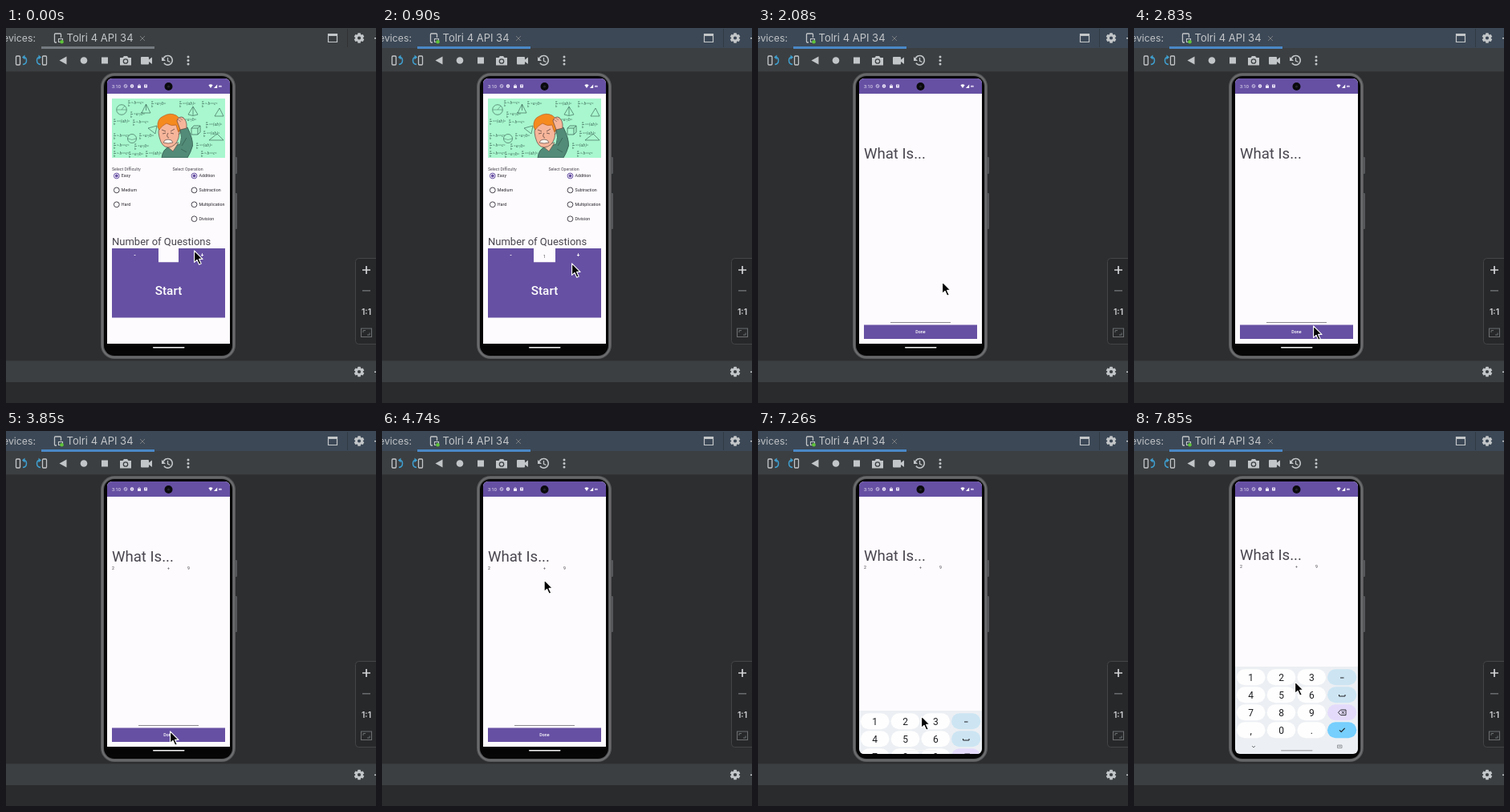
Write an HTML page with a canvas that moves like this. It is 461 px wide and 468 px high and loops after 8 s.

```html
<!DOCTYPE html>
<html lang="en">
<head>
<meta charset="utf-8">
<title>Quiz app in emulator</title>
<style>
html, body { margin: 0; width: 100%; height: 100%; overflow: hidden; background: #2d2e30; }
canvas { display: block; width: 461px; height: 468px; }
</style>
</head>
<body>
<canvas id="stage" width="461" height="468"></canvas>
<script>
const ctx = document.getElementById('stage').getContext('2d');
const LOOP = 8000, TICK = 148.2;
const PURPLE = '#6650a3', PAPER = '#fefbfe', INK = '#48454e', ICON = '#c3c6c8';
const UI = 'Inter, sans-serif', APP = 'Roboto, sans-serif';

// pointer stops: tick, x, y
const PATH = [
  [0, 234, 277], [3, 234, 277], [4, 235, 284], [6, 236, 293], [8, 237, 287],
  [9, 237, 287], [11, 235, 299], [12, 229, 316], [16, 229, 316], [19, 223, 371],
  [20, 214, 374], [22, 171, 217], [24, 205, 374], [26, 204, 374], [28, 207, 290],
  [32, 201.5, 185], [34, 197.5, 178.5], [35, 197.5, 178.5], [38, 188.5, 216],
  [41, 213, 160], [42, 218.5, 165], [44, 218.5, 165], [48, 203, 355],
  [50, 203, 355], [52, 202, 335], [53, 200, 312]
];

function box(x, y, w, h, fill, r = 0) {
  ctx.fillStyle = fill;
  ctx.beginPath();
  ctx.roundRect(x, y, w, h, r);
  ctx.fill();
}
function frame(x, y, w, h, color, lw = 1, r = 0) {
  ctx.strokeStyle = color;
  ctx.lineWidth = lw;
  ctx.beginPath();
  ctx.roundRect(x, y, w, h, r);
  ctx.stroke();
}
function disc(x, y, r, fill) {
  ctx.fillStyle = fill;
  ctx.beginPath();
  ctx.arc(x, y, r, 0, 7);
  ctx.fill();
}
function ring(x, y, r, color, lw = 1, a = 0, b = Math.PI * 2) {
  ctx.strokeStyle = color;
  ctx.lineWidth = lw;
  ctx.beginPath();
  ctx.arc(x, y, r, a, b);
  ctx.stroke();
}
function shape(d, fill, stroke, lw = 1) {
  const p = new Path2D(d);
  if (fill) { ctx.fillStyle = fill; ctx.fill(p); }
  if (stroke) { ctx.strokeStyle = stroke; ctx.lineWidth = lw; ctx.stroke(p); }
}
function text(s, x, y, size, color, align = 'left', weight = 400, family = APP) {
  ctx.font = `${weight} ${size}px ${family}`;
  ctx.textAlign = align;
  ctx.fillStyle = color;
  ctx.fillText(s, x, y);
}

function gear(x, y) {
  for (let i = 0; i < 6; i++) {
    ctx.save();
    ctx.translate(x, y);
    ctx.rotate(i * Math.PI / 3);
    box(-1.8, -6.3, 3.6, 3, ICON, .5);
    ctx.restore();
  }
  ring(x, y, 3.5, ICON, 2.8);
}

function header(focused) {
  box(0, 0, 461, 25, focused ? '#3c4856' : '#3c3f41');
  text('evices:', 37, 17, 12.3, '#bfc2c5', 'right', 400, UI);
  shape('M63 18H61.5Q60.5 18 60.5 17V8Q60.5 7 61.5 7H67.5Q68.5 7 68.5 8V12', null, ICON, 1.3);
  frame(65.5, 13.5, 5, 4, ICON, 1.1);
  disc(69.5, 17.3, 2.3, '#5fc33b');
  text('Tolri 4 API 34', 75.5, 17, 13, '#c3c6c9', 'left', 400, UI);
  shape('M167 10L173 16M173 10L167 16', null, '#777b7f');
  frame(401.5, 7.5, 11, 10, ICON, 1.2);
  box(401, 7, 12, 3, ICON);
  box(425, 1, 1, 23, focused ? '#2f3a45' : '#2f3133');
  gear(440, 12.5);
  box(459, 12, 2, 1.5, ICON);
}

function toolbar(focused) {
  const blue = '#3f9fd0';
  box(0, 25, 461, 29, '#3c3f41');
  box(44, 23, 141, 3, focused ? '#4a88c7' : '#747a80');
  for (const [px, ax, dir] of [[12.5, 20, 1], [45.5, 44, -1]]) {
    frame(px, 35, 5, 11, ICON, 1.3, 1);
    ctx.save();
    ctx.translate(ax, 40.5);
    ctx.scale(dir, 1);
    shape('M2 -4Q5.5 -4 5.5 0Q5.5 4.5 1 5', null, blue, 1.5);
    shape('M0 -4L3.5 -7V-1Z', blue);
    ctx.restore();
  }
  shape('M66.5 40.5L75.5 35.5V45.5Z', ICON);
  disc(97, 40.5, 4.3, ICON);
  box(119, 36.5, 8, 8, ICON);
  shape('M142 37H145.5L147 35H151L152.5 37H156V46.5H142Z', ICON);
  ring(149, 41.5, 2.7, '#3c3f41', 1.3);
  box(168, 36, 10, 9.5, ICON, 1);
  shape('M178 39.5L182 36.5V45L178 42Z', ICON);
  ring(201.5, 40.3, 5.8, ICON, 1.6, -2.8, 2.5);
  shape('M194 36V41H199Z', ICON);
  shape('M201.5 37V41L204.5 42.5', null, ICON, 1.3);
  for (const y of [36, 40.5, 45]) disc(227, y, 1.5, ICON);
}

function chrome(focused) {
  box(0, 0, 461, 468, '#2d2e30');
  header(focused);
  toolbar(focused);
  box(0, 54, 461, 1, '#313335');
  box(435.5, 287.5, 40, 107, '#27282a', 4);
  frame(435.5, 287.5, 40, 107, '#434547', 1, 4);
  shape('M444 302H454M449 297V307', null, '#d2d4d6', 1.7);
  box(444, 327, 10, 1.6, '#66696c');
  text('1:1', 449, 357.7, 10.3, '#d0d2d4', 'center', 600, UI);
  frame(442.5, 375, 13, 10.5, '#6b6e70', 1.1);
  shape('M445 380V377.5H448M453 380.5V383H450', null, '#6b6e70');
  box(0, 415, 461, 27, '#3c3f41');
  box(0, 415, 461, 1, '#37393b');
  box(0, 442, 461, 26, '#2a2b2c');
  gear(440, 429);
  box(459, 428.5, 2, 1.5, ICON);
}

function body() {
  box(285, 161, 3, 21, '#55575a', 1);
  box(285, 206, 3, 45, '#55575a', 1);
  box(118, 56, 168, 357, '#58595a', 17);
  frame(120, 58, 164, 353, '#757677', 1.2, 15);
  box(122, 60, 160, 349, '#060607', 13);
}

function statusBar() {
  box(126, 63, 153, 19, PURPLE);
  text('3:10', 132, 75, 5.6, '#f0ecf8');
  ring(149, 72.5, 1.9, '#e4ddf3', .8);
  shape('M147.8 71.3L150.2 73.8', null, '#e4ddf3', .7);
  disc(157, 72.5, 2.2, '#efe9fa');
  disc(157, 72.5, .7, PURPLE);
  box(164, 72, 4, 3, '#efe9fa');
  ring(166, 72, 1.3, '#efe9fa', .8, Math.PI, 0);
  box(172, 70.5, 4, 4, '#efe9fa', .5);
  box(173.4, 71.6, 1.4, 1.2, PURPLE);
  shape('M252.4 71.2Q255 69.4 257.6 71.2L255 75Z', '#fff');
  shape('M259 75H263.2V70.4Z', '#fff');
  box(265, 71.8, 3.8, 2, '#d6cbed', .6);
  disc(202.5, 73, 5, '#0a0a0d');
  disc(202.5, 73, 1.6, '#23232b');
}

// a formula with one built-up fraction
function formula(x, y, s, pen) {
  const put = (t, dx, dy, size) =>
    text(t, x + dx, y + dy, size, pen, 'left', 'italic', 'Noto Serif, serif');
  put('a', 0, -1.6, 4.2);
  put('b', 0, 3.6, 4.2);
  box(x, y - .9, 3, .6, pen);
  put(s, 4, 1, 5);
}

function doodles() {
  const pen = '#3f6d5c';
  const sums = ['ⁿ·bⁿ=cⁿ', '=aⁿ/bⁿ', 'ⁿ=(ab)ⁿ'];
  [[152, 94], [181, 95], [216, 95], [244, 95], [155, 108], [134, 117],
   [158, 118], [219, 115], [249, 121], [134, 135], [166, 135], [246, 132],
   [134, 147], [160, 148], [237, 147], [134, 157], [153, 158], [174, 157], [243, 157]
  ].forEach(([x, y], i) => formula(x, y, sums[i % 3], pen));
  ring(144, 102, 6.3, pen, .7);
  shape('M138 102H150M144 102L148 97', null, pen, .5);
  shape('M169 106L174.5 95L180 106ZM174.5 95V103', null, pen, .7);
  shape('M227 108L233 98L239 108Q233 111 227 108M233 98V109', null, pen, .7);
  shape('M260 110L266 100L271 110Z', null, pen, .7);
  shape('M231 125H239V133H231ZM231 125L234 122H242V130L239 133M239 125L242 122', null, pen, .8);
  shape('M177 125L188 122L186 132Z', null, pen, .7);
  shape('M253 140L263 132L271 140Z', null, pen, .7);
  ring(157, 138, 5.5, pen, .7);
  shape('M151.5 138Q157 141 162.5 138', null, pen, .5);
}

function thinker() {
  const line = '#5d4540', skin = '#f6b59a', coat = '#528b78', seam = '#32594e';
  shape('M194 162Q195 151 204 148L217 145Q220 137 217 127L226 124Q233 138 232.5 147Q230 156 226 162Z', coat, seam, .8);
  shape('M200 147L208 154L215 143Z', '#f3c6a8', line, .6);
  shape('M191 124Q189 130 191 136Q194 149 202 149Q212 148 215 137L217 122Q211 114 199 115Z', skin, line, .7);
  shape('M189 124Q188 113 196 110Q204 105 212 109Q220 114 218 125L215 130Q213 126 212 121Q206 123 200 119Q194 122 191 127Z', '#f58a1f', '#a9551d', .6);
  ring(215, 130, 2.4, line, .6, -1.5, 1.7);
  shape('M217 127Q215 121 213 116Q214 111 219 111Q226 114 225 125Z', skin, line, .7);
  shape('M214 114L218 117M216 112L220 115', null, line, .5);
  shape('M194 127L199 129M205 129L210 126M195 132L199 131M205 131L209 132M202 131Q199 136 203 137', null, line, .8);
  shape('M196 143Q197 139 202 139Q207 139 208 143Q202 145 196 143Z', '#fff6ee', line, .7);
  shape('M225 137L219 147M218 151L225 155', null, seam, .7);
}

function picture() {
  ctx.save();
  ctx.beginPath();
  ctx.rect(132, 88, 141, 74);
  ctx.clip();
  box(132, 88, 141, 74, '#a8f7ce');
  doodles();
  thinker();
  ctx.restore();
}

function radio(x, y, label, on) {
  ring(x, y, 3.4, on ? PURPLE : INK, 1);
  if (on) disc(x, y, 1.9, PURPLE);
  text(label, x + 6, y + 1.9, 5.3, '#25232a');
}

function setupScreen(count) {
  picture();
  text('Select Difficulty', 132, 177.6, 5.2, INK);
  text('Select Operation', 207.5, 177.6, 5.2, INK);
  ['Easy', 'Medium', 'Hard'].forEach((s, i) => radio(137.8, 184.5 + i * 17.9, s, !i));
  ['Addition', 'Subtraction', 'Multiplication', 'Division']
    .forEach((s, i) => radio(234.5, 184.5 + i * 17.9, s, !i));
  text('Number of Questions', 132, 271, 13, INK);
  box(132, 275, 141, 86.4, PURPLE);
  const inset = count ? 0 : 1;
  box(189 + inset, 275, 27 - 2 * inset, 17.2, PAPER);
  text(count || '', 202.5, 287, 5.2, INK, 'center');
  text('-', 160.5, 286, 6.5, '#fff', 'center', 700);
  text('+', 244.5, 286.2, 6.5, '#fff', 'center', 700);
  text('Start', 202.5, 333.2, 15.3, '#fff', 'center', 500);
}

function quizScreen(asked, lift) {
  text('What Is...', 132, 162.5 - lift, 18.6, INK);
  if (asked) {
    const y = 173 - lift;
    text('2', 132, y, 5.2, INK);
    text('+', 202.5, y, 5.2, INK, 'center');
    text('9', 227.5, y, 5.2, INK, 'center');
  }
  box(165, 367, 75, 1, '#8d8a91');
  box(132, 370.5, 141, 17.5, PURPLE);
  text('Done', 202.5, 381.3, 5.3, '#fff', 'center', 500);
}

function keyboard(slide) {
  const ink = '#1e1f22';
  const rows = ['123', '456', '789', ',0.'];
  const side = ['#cde5f3', '#cde5f3', '#e4dbfb', '#76cffd'];
  ctx.save();
  ctx.translate(0, (1 - slide) * 110);
  box(126, 294, 153, 110, '#eceff3');
  rows.forEach((row, r) => {
    const y = 307.3 + r * 22;
    [...row].forEach((k, c) => {
      const x = 145.7 + c * 37.8;
      box(x - 17.8, y - 10, 35.6, 20, '#fefefe', 10);
      text(k, x, y + 4.3, 12, ink, 'center');
    });
    box(241, y - 10, 36.3, 20, side[r], 10);
  });
  box(257, 307.4, 4.5, 1, ink);
  shape('M255.5 329V331H263V329', null, ink);
  shape('M254.5 351.3L257.5 348H264V354.6H257.5ZM258.8 349.6L262 353M262 349.6L258.8 353', null, ink, .9);
  shape('M256 373.3L258.2 375.5L262.7 370.8', null, ink, 1.1);
  shape('M147 393L149 395L151 393', null, '#66686c', .9);
  frame(253.5, 392, 5.5, 3.5, '#85878b', .8);
  box(254.5, 393.2, 3.5, .7, '#85878b');
  ctx.restore();
}

function pointer(n) {
  let i = 1;
  while (i < PATH.length - 1 && PATH[i][0] < n) i++;
  const [a, x0, y0] = PATH[i - 1], [b, x1, y1] = PATH[i];
  const k = Math.min(1, (n - a) / (b - a));
  ctx.save();
  ctx.translate(x0 + (x1 - x0) * k, y0 + (y1 - y0) * k);
  ctx.lineJoin = 'round';
  shape('M.6 .8V15.4L4 12.3L6.7 18.2L9.2 17.1L6.6 11.4H11Z', '#050505', '#fff', 1.1);
  ctx.restore();
}

function draw(t) {
  const n = Math.floor((t + 7) / TICK);
  const slide = Math.sin(Math.max(0, Math.min(1, (n - 48) / 3)) * Math.PI / 2);
  chrome(n >= 1);
  body();
  ctx.save();
  ctx.beginPath();
  ctx.roundRect(126, 63, 153, 340, 6);
  ctx.clip();
  box(126, 63, 153, 331, PAPER);
  box(126, 394, 153, 9, '#050506');
  statusBar();
  if (n < 14) setupScreen(n >= 9 ? '2' : n >= 2 ? '1' : '');
  else quizScreen(n >= 26, slide * 2);
  if (slide > 0) keyboard(slide);
  box(183, 398, 39.5, 1.5, n >= 53 ? '#aeb0b4' : '#f6f6f6', .7);
  ctx.restore();
  pointer(n);
}

function loop(now) {
  draw(now % LOOP);
  requestAnimationFrame(loop);
}
draw(0);
requestAnimationFrame(loop);
</script>
</body>
</html>
```
